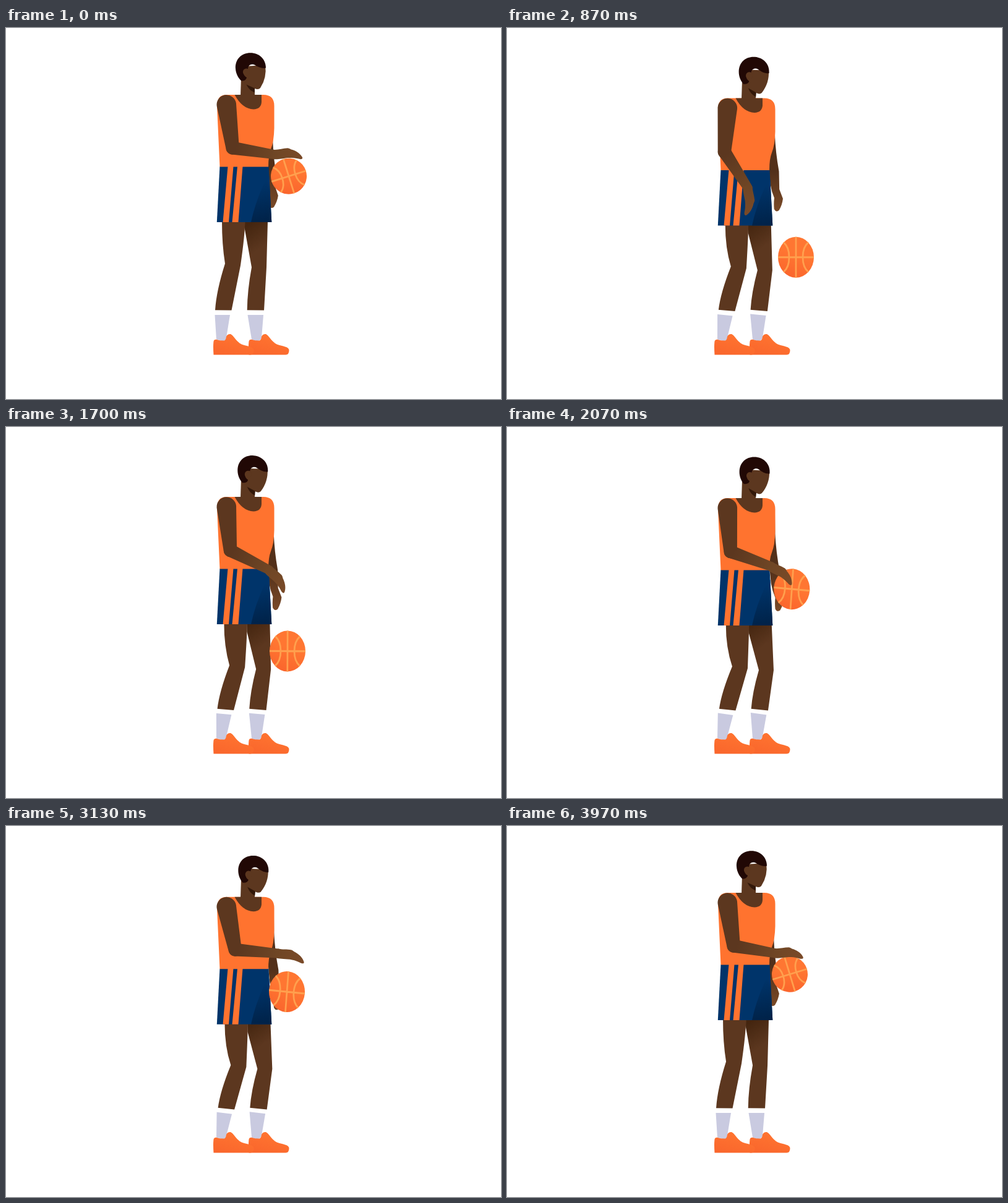
Animation, 800 px wide and 600 px high, one loop 4010 ms. Source, as an HTML page:

```html
<!DOCTYPE html>
<html lang="en">
<head>
<meta charset="utf-8">
<title>Dribble</title>
<style>
  html, body { margin: 0; width: 100%; height: 100%; overflow: hidden; background: #fff; }
  svg { display: block; width: 800px; height: 600px; }
</style>
</head>
<body>
<svg viewBox="0 0 800 600" xmlns="http://www.w3.org/2000/svg">
  <defs>
    <linearGradient id="forearmSkin" gradientUnits="userSpaceOnUse" x1="5" y1="0" x2="69" y2="0">
      <stop offset="0" stop-color="#5c371f"/><stop offset="1" stop-color="#6f4625"/>
    </linearGradient>
    <linearGradient id="handSkin" gradientUnits="userSpaceOnUse" x1="0" y1="0" x2="45" y2="0">
      <stop offset="0" stop-color="#6f4625"/><stop offset="1" stop-color="#7a4a28"/>
    </linearGradient>
    <linearGradient id="farSkin" gradientUnits="userSpaceOnUse" x1="0" y1="130" x2="0" y2="290">
      <stop offset=".6" stop-color="#53301a"/><stop offset="1" stop-color="#7a4a28"/>
    </linearGradient>
    <linearGradient id="farLegSkin" gradientUnits="userSpaceOnUse" x1="388" y1="320" x2="412" y2="356">
      <stop offset="0" stop-color="#44250f"/><stop offset="1" stop-color="#5c371f"/>
    </linearGradient>
    <linearGradient id="shade" gradientUnits="userSpaceOnUse" x1="408" y1="250" x2="420" y2="314">
      <stop offset="0" stop-color="#00346a"/><stop offset="1" stop-color="#002248"/>
    </linearGradient>
    <linearGradient id="shoeFill" x1="0" y1="1" x2=".5" y2="0">
      <stop offset="0" stop-color="#f9652c"/><stop offset="1" stop-color="#ff7430"/>
    </linearGradient>
    <linearGradient id="ballFill" x1=".25" y1="1" x2=".6" y2="0">
      <stop offset="0" stop-color="#fa642c"/><stop offset=".6" stop-color="#ff7632"/>
    </linearGradient>
    <path id="shoe" fill="url(#shoeFill)" d="M335.500 528.500 Q334.500 514 335.500 507 Q336 503.500 340 503.700 Q347 506 353 505.500 Q355.500 504 356 499 Q358 494.500 363 495 C369 498 372 508 382 512 C390 515 400 515 400.500 521 Q400.500 528.500 395 528.500Z"/>
  </defs>

  <g id="farArm">
    <path fill="url(#farSkin)" d="M420 125 L433 130 L433.500 165 Q435 195 441 226 L442 255 L448 270 Q447 280 442 289 Q437 293 434 287 Q433 278 434 269 Q429 258 427 245 L424 215Z"/>
  </g>
  <path id="farSock" fill="#c9cae0"/>
  <path id="nearSock" fill="#c9cae0"/>
  <use href="#shoe" x="57"/>
  <use href="#shoe"/>
  <path id="farLeg" fill="url(#farLegSkin)"/>
  <path id="nearLeg" fill="#5c371f"/>

  <g id="body">
    <path fill="#00346a" d="M345.500 224 H424.500 L429.300 314 H340.800Z"/>
    <path fill="url(#shade)" d="M422 240 L425.400 240 L429.300 314 H396 Q403 280 422 240Z"/>
    <path fill="#ff732f" d="M358.500 224 H367.500 L360 314 H350.500Z M374 224 H382.500 L375.500 314 H365.500Z"/>
    <path fill="#ff732f" d="M356 108 H416 Q433.500 108 433.500 126 V162 Q433 184 428 196 Q424 206 424 224.500 H345.500 L341 126 Q341 108 356 108Z"/>
    <path fill="#5c371f" d="M369.500 108 H413 V120 Q412 131 400 131.500 Q382 131 369.500 108Z"/>
    <path fill="#5c371f" d="M380 80 L379 110 H402 V85Z"/>
  </g>
  <g id="head">
    <path fill="#5c371f" d="M379.500 82 L384 62 L419 60 Q422 80 411 97 Q408 100.500 402 98 L389 92Z"/>
    <path fill="#32180a" d="M388.500 91.500 L402 97.500 V104.500 Q393 101 388.500 91.500Z"/>
    <path fill="#210805" d="M371 66 C370 50 381 40.200 395 40.200 C409 40.200 420 50 420 64.500 C414 66 407 63 402 59.800 C397 57 391 60 391 66 L386 66.500 C382 70 383 77 389 80 Q388 85.500 380.500 85.500 C376 82 371.500 74 371 66Z"/>
    <circle cx="388.500" cy="71" r="5.600" fill="#5c371f"/>
  </g>

  <g id="ball">
    <circle r="29" fill="url(#ballFill)"/>
    <path fill="none" stroke="#ffa04e" stroke-width="2.700" d="M-29 0 H29 M0 -29 V29 M-20 -21 C-8 -12 -8 12 -20 21 M20 -21 C8 -12 8 12 20 21"/>
  </g>

  <g id="upperArm"><path fill="#5c371f" d="M-15.800 0 A15.800 15.800 0 0 1 15.800 0 L10.700 70.700 A10.700 10.700 0 0 1 -10.700 70.700Z"/></g>
  <g id="forearm"><path fill="url(#forearmSkin)" d="M0 -10.600 L69 -7.500 A7.500 7.500 0 0 1 69 7.500 L0 10.600 A10.600 10.600 0 0 1 0 -10.600Z"/></g>
  <g id="hand"><path fill="url(#handSkin)" d="M-2 -7.500 C6 -8 12 -11 20 -12 C23 -12 25 -10 28 -10 C36 -8 42 -4 45 1 C46 4 42 4.500 38 3.500 C32 2.500 26 3 22 3.500 C12 5.500 6 8 -2 7.700Z"/></g>
</svg>

<script>
const LOOP = 4010, FRAMES = 120, CYCLE = LOOP / 3;
const part = id => document.getElementById(id);
const clamp = x => Math.max(0, Math.min(1, x));
const smooth = x => { x = clamp(x); return x * x * (3 - 2 * x); };
const place = (id, transform) => part(id).setAttribute('transform', transform);
const draw = (id, d) => part(id).setAttribute('d', d);

// Cyclic cubic through [time, value...] keys; tangents are flat at turning points.
function track(keys, t, col) {
  const n = keys.length;
  const key = i => {
    const lap = Math.floor(i / n), k = keys[i - lap * n];
    return [k[0] + lap * CYCLE, k[col]];
  };
  const slope = i => {
    const [a, b] = [key(i), key(i + 1)];
    return (b[1] - a[1]) / (b[0] - a[0]);
  };
  const tangent = i => {
    const p = slope(i - 1), q = slope(i);
    return p * q <= 0 ? 0 : 2 * p * q / (p + q);
  };
  let i = n - 1;
  while (keys[i][0] > t) i--;
  const [t0, v0] = key(i), [t1, v1] = key(i + 1);
  const h = t1 - t0, u = (t - t0) / h, w = 1 - u;
  return v0 * (1 + 2 * u) * w * w + h * tangent(i) * u * w * w
       + v1 * u * u * (3 - 2 * u) - h * tangent(i + 1) * u * u * w;
}

// time, upper arm from vertical, forearm and hand from horizontal (degrees)
const ARM = [
  [0, 8, 8.8, 5], [33, 5.6, 10.5, 15], [62, 4, 20, 38], [195, -4, 57, 92], [232, -5, 61, 94],
  [468, 11.3, 5, 17], [545, 9, 8, 6], [655, 8, 9, 6], [735, 4, 20, 39], [869, -4, 57, 92],
  [908, -5, 61, 94], [1215, 10.5, 7, 17], [1303, 8, 9.8, 7]
];
// time, ball x, ball rotation
const ROLL = [
  [0, 457, -17.5], [33, 457, -16.5], [283, 456, -5], [468, 454, 5], [600, 455, 6],
  [735, 460.3, 4.5], [869, 467, 0], [962, 473, -4], [1097, 465, -9], [1303, 457, -17]
];
const FLOOR = 500, HIGH = 239, LOW = 246, BOUNCES = [283, 958];

function ballY(t) {
  if (t > 1322) t -= CYCLE;
  const arc = (top, apex, bounce) => top + (FLOOR - top) * ((t - apex) / (bounce - apex)) ** 2;
  if (t < 283) return arc(HIGH, -15, 283);
  if (t < 545) return arc(LOW, 545, 283);
  if (t < 660) return LOW;
  if (t < 958) return arc(LOW, 660, 958);
  return arc(HIGH, 1322, 958);
}

function ballHeight(t) {
  const speed = Math.abs(ballY(t + 2) - ballY(t - 2)) / 4;
  const impact = Math.max(...BOUNCES.map(b => clamp(1 - Math.abs(t - b) / 35)));
  return 29 + 4 * clamp((speed - .28) / .12) * (1 - impact) - 2 * impact;
}

const dip = t => t < 600 ? smooth(t / 590) : 1 - smooth((t - 640) / (CYCLE - 640));

function drawLegs(b) {
  const hip = (x, y) => `${x + 5 * b} ${y + 7.5 * b}`;
  const knee = (x, y) => `${x + 10.5 * b} ${y + 6.5 * b}`;
  const shin = (x, y) => `${x + 7 * b} ${y + 4 * b}`;
  const ankle = (x, y) => `${x + 5.2 * b} ${y + (y > 456.3 ? 2 : -.5) * b}`;
  const cuff = (x, y, drop) => `${x + 3.5 * b} ${y + drop * b}`;
  draw('nearLeg', `M${hip(349, 312)} L${hip(386.5, 312)} Q${hip(386, 335)} ${knee(379, 384)}
    L${ankle(364.5, 456.6)} L${ankle(338, 456.2)} Q${shin(340, 425)} ${knee(354, 381)} Q${hip(349, 350)} ${hip(349, 312)}Z`);
  draw('farLeg', `M${hip(386, 312)} L${hip(423, 312)} L${knee(421, 387)} L${ankle(417, 456.6)}
    L${ankle(389.7, 456.2)} Q${shin(390, 425)} ${knee(397, 387)} L${hip(386, 326)}Z`);
  draw('nearSock', `M${cuff(337.5, 464, -1.5)} L${cuff(362, 464, 2)} L356 501 Q355 507 349 506 L340 503.500Z`);
  draw('farSock', `M${cuff(390.5, 464, -2)} L${cuff(416, 464, 1.5)} L413 501 Q411 507 404 506 L397 503.500Z`);
}

function drawArm(t, drop) {
  const rad = Math.PI / 180;
  const [upper, fore, hand] = [1, 2, 3].map(c => track(ARM, t, c));
  const sx = 356.3, sy = 124 + drop;
  const ex = sx + 70.7 * Math.sin(upper * rad), ey = sy + 70.7 * Math.cos(upper * rad);
  const wx = ex + 69 * Math.cos(fore * rad), wy = ey + 69 * Math.sin(fore * rad);
  place('upperArm', `translate(${sx} ${sy}) rotate(${-upper})`);
  place('forearm', `translate(${ex} ${ey}) rotate(${fore})`);
  place('hand', `translate(${wx} ${wy}) rotate(${hand})`);
}

function render(ms) {
  const frame = Math.min(FRAMES - 1, Math.floor((ms % LOOP + 4) / (100 / 3)));
  const t = frame % 40 * CYCLE / 40;
  const b = dip(t), drop = 7.5 * b;
  place('body', `translate(0 ${drop})`);
  place('head', `translate(0 ${drop + .5 * b}) rotate(${6.5 * b} 391 108)`);
  place('farArm', `translate(0 ${drop}) rotate(${3 * (1 - b)} 424 115)`);
  drawLegs(b);
  drawArm(t, drop);
  place('ball', `translate(${track(ROLL, t, 1)} ${ballY(t)}) scale(1 ${ballHeight(t) / 29}) rotate(${track(ROLL, t, 2)})`);
}

const start = performance.now();
function tick() {
  render(performance.now() - start);
  requestAnimationFrame(tick);
}
tick();
</script>
</body>
</html>
```
